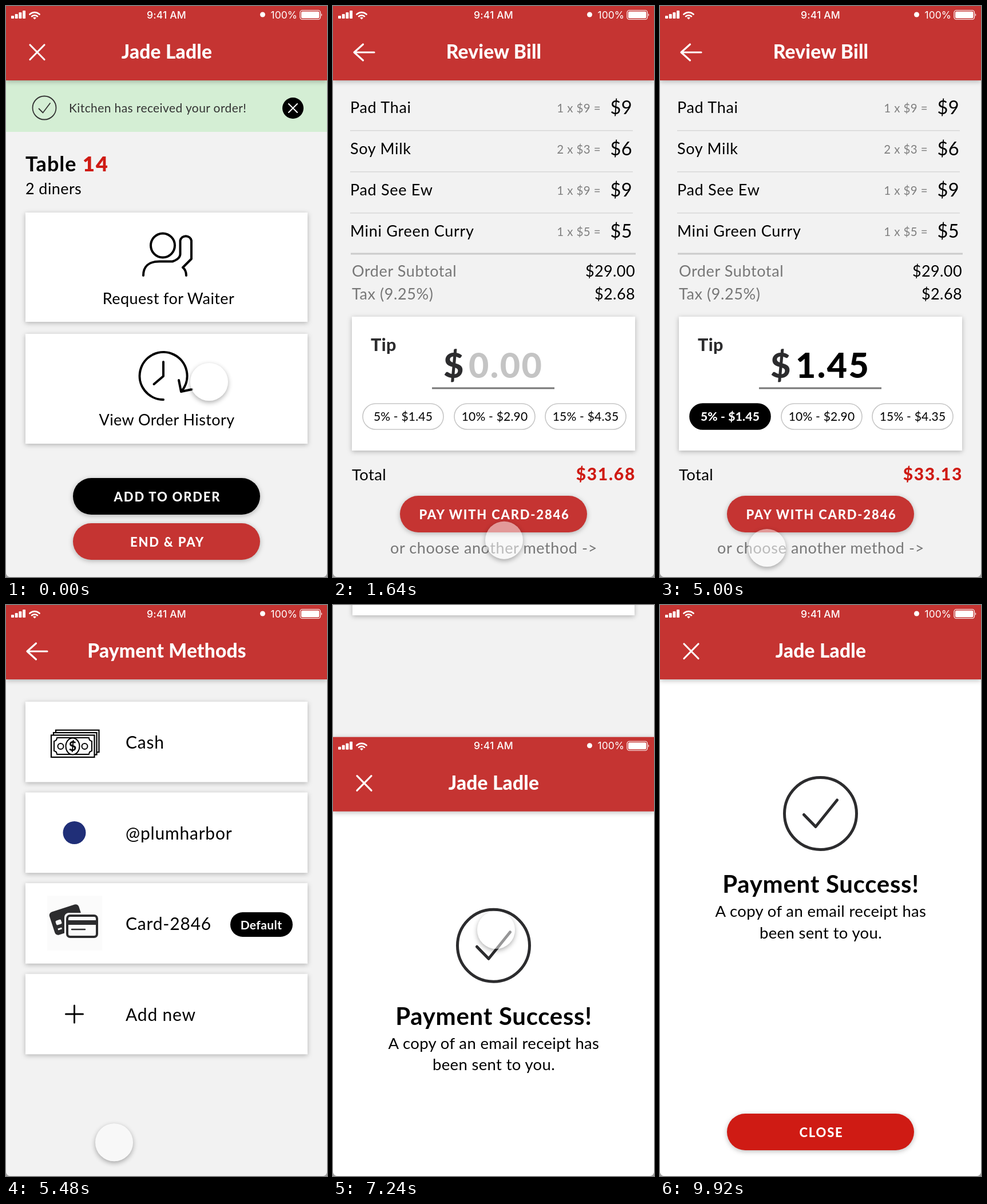
These frames come from a looping animation (561 px wide and 998 px high, 9.96 s). An HTML page:

```html
<!DOCTYPE html>
<html lang="en">
<head>
<meta charset="utf-8">
<title>Restaurant checkout</title>
<style>
  html, body { margin: 0; width: 100%; height: 100%; overflow: hidden; background: #a4a4a4; }
  #stage { position: relative; width: 561px; height: 998px; overflow: hidden; border-radius: 0 0 8px 8px; background: #f2f2f2; }
  svg { display: block; font-family: Lato, "Open Sans", sans-serif; }
  .shade { filter: drop-shadow(0 2px 4px rgba(0, 0, 0, .27)); }
  .line { fill: none; stroke-linecap: round; stroke-linejoin: round; }
  #cursor { position: absolute; left: -33px; top: -33px; width: 66px; height: 66px; border-radius: 50%;
    background: rgba(255, 255, 255, .5); box-shadow: 0 3px 8px rgba(0, 0, 0, .32); }
</style>
</head>
<body>
<div id="stage">
  <svg id="art" width="561" height="998"></svg>
  <div id="cursor"></div>
</div>
<script>
const RED = '#c53432', BRIGHT = '#cf1b14', DARK = '#2c2c2e';
const $ = id => document.getElementById(id);

// Drawing helpers
const text = (x, y, str, { size = 27, weight = 400, fill = '#000', gap = .4, anchor = 'start', font = '' } = {}) =>
  `<text x="${x}" y="${y}" font-size="${size}" font-weight="${weight}" fill="${fill}" letter-spacing="${gap}"
    text-anchor="${anchor}" ${font && `font-family="${font}"`}>${str}</text>`;
const mid = (x, y, str, o) => text(x, y, str, { anchor: 'middle', ...o });
const end = (x, y, str, o) => text(x, y, str, { anchor: 'end', ...o });
const rect = (x, y, w, h, fill, more = '') =>
  `<rect x="${x}" y="${y}" width="${w}" height="${h}" fill="${fill}" ${more}/>`;
const circle = (x, y, r, fill, more = '') => `<circle cx="${x}" cy="${y}" r="${r}" fill="${fill}" ${more}/>`;
const line = (d, width, color = '#000') => `<path class="line" d="${d}" stroke="${color}" stroke-width="${width}"/>`;
const card = (x, y, w, h) => rect(x, y, w, h, '#fff', 'class="shade"');
const button = (y, str, fill) => rect(117, y, 327, 64, fill, 'rx="32" class="shade"') +
  mid(282, y + 40.5, str, { size: 22, weight: 800, fill: '#fff', gap: 1.8 });
const group = (id, body) => `<g id="${id}">${body}</g>`;

const statusBar = () => {
  const bars = [5, 8, 11, 14].map((h, i) => rect(9 + i * 6.7, 22 - h, 5, h, '#fff', 'rx="1"')).join('');
  const wifi = line('M41.5 14.5A12.3 12.3 0 0 1 58.5 14.5', 2.8, '#fff') +
    line('M45 18.2A7.2 7.2 0 0 1 55 18.2', 2.6, '#fff') + '<path d="M47 20.6Q50 18.4 53 20.6L50 23.4Z" fill="#fff"/>';
  const font = 'Inter, Roboto, sans-serif';
  return bars + wifi +
    mid(280.5, 21.5, '9:41 AM', { size: 17.5, weight: 500, fill: '#fff', gap: .2, font }) +
    circle(448.5, 15, 4.5, '#fff') +
    end(509, 21.5, '100%', { size: 17.5, fill: '#fff', gap: 0, font }) +
    rect(514, 7.5, 35.5, 16, 'none', 'rx="4" stroke="#fff" stroke-width="1.2"') +
    rect(516, 9.5, 31.5, 12, '#fff', 'rx="2"') + '<path d="M551 13q2.5 2.5 0 5z" fill="#fff"/>';
};
const header = (title, icon) => rect(0, 0, 561, 130, RED, 'class="shade"') + statusBar() +
  line(icon, 3.2, '#fff') + mid(281, 92, title, { size: 33.5, weight: 800, fill: '#fff', gap: .2 });
const cross = 'M42 68L67 93.500M67 68L42 93.500', back = 'M72 81H37M52.500 67L37 81L52.500 95';

const home = () => rect(0, 0, 561, 998, '#f2f2f2') + rect(0, 130, 561, 90, '#d4eed4') +
  header('Jade Ladle', cross) +
  circle(67, 178, 20.5, 'none', 'stroke="#333" stroke-width="1.8"') + line('M57.500 179.500L64.500 186.500L77 170', 1.8, '#333') +
  text(110, 186, 'Kitchen has received your order!', { size: 21, fill: '#333' }) +
  circle(501.5, 178.5, 18.5, '#000') + line('M494 171L509 186M509 171L494 186', 2, '#fff') +
  text(34, 289, 'Table', { size: 36, weight: 700, gap: 1 }) + text(134, 289, '14', { size: 36, weight: 900, fill: BRIGHT, gap: 2 }) +
  text(34, 329, '2 diners') +
  card(34, 361, 493, 191) + circle(274, 418.5, 21, 'none', 'stroke="#000" stroke-width="4"') +
  line('M240 471C240 455 250 446.500 268 446.500H291Q304 442 304.500 434V410A10 10 0 0 1 324 410V442L309 457Q315 462 315 471', 4) +
  mid(284, 521, 'Request for Waiter') +
  card(34, 573, 493, 192) + line('M275 688A41.500 41.500 0 1 1 307 673', 4) +
  line('M275 622V647L258.500 661M302 654L306 674L325 670', 4) +
  mid(281, 733, 'View Order History') +
  button(825, 'ADD TO ORDER', '#000') + button(904, 'END &amp; PAY', RED);

const pill = (x, str, on) =>
  rect(x + 1, 695, 141, 45, on ? '#000' : '#fff', `rx="22.5" stroke="${on ? '#000' : '#c6c6c6'}" stroke-width="1.6"`) +
  mid(x + 71.5, 724.5, str, { size: 21, gap: .2, fill: on ? '#fff' : '#000', weight: on ? 800 : 400 });
const tipState = (amount, total, on) =>
  text(237, 650, amount, { size: 61, weight: 800, fill: on ? '#000' : '#c4c4c4', gap: 2.4 }) +
  pill(51, '5% - $1.45', on) +
  end(529, 829, total, { size: 30, weight: 800, fill: BRIGHT, gap: 1.7 });
const bill = () => {
  const items = [['Pad Thai', 1, 9], ['Soy Milk', 2, 3], ['Pad See Ew', 1, 9], ['Mini Green Curry', 1, 5]];
  const rows = items.map(([name, count, price], i) => {
    const y = 187 + i * 72;
    return text(30, y, name, { gap: .7 }) + end(468, y - 1, `${count} x $${price} =`, { size: 20.5, fill: '#808080' }) +
      end(523, y + 1.5, '$' + count * price, { size: 32.5 }) + (i < 3 ? rect(30, y + 30, 494, 1.5, '#d8d8d8') : '');
  }).join('');
  const gray = { fill: '#777', gap: .6 };
  return rect(0, 0, 561, 998, '#f2f2f2') + header('Review Bill', back) + rows +
    rect(31, 431.5, 498, 3, '#cbcbcb') +
    text(33, 473, 'Order Subtotal', gray) + end(528, 473, '$29.00') +
    text(33, 513, 'Tax (9.25%)', gray) + end(528, 513, '$2.68') +
    card(33, 543, 495, 234) + text(66, 603, 'Tip', { size: 30.5, weight: 800, fill: DARK }) +
    text(193, 650, '$', { size: 61, weight: 800, fill: DARK }) + rect(173, 666.5, 214, 3, '#777') +
    pill(211, '10% - $2.90') + pill(370, '15% - $4.35') +
    text(33, 829, 'Total', { size: 27.5 }) +
    group('noTip', tipState('0.00', '$31.68', false)) + group('tip', tipState('1.45', '$33.13', true)) +
    button(856, 'PAY WITH CARD-2846', RED) +
    mid(281, 957, 'or choose another method -&gt;', gray);
};

const cashIcon = () => {
  const notes = [8, 4, 0].map(d => rect(79 + d, 227.5 - d * 1.1, 75.5, 38.5, '#fff', 'stroke="#000" stroke-width="2.2"')).join('');
  const ring = 'stroke="#000" stroke-width="2"';
  return notes + line('M89 232H145Q145 237 150 238V255Q145 256 145 261H89Q89 256 84 255V238Q89 237 89 232Z', 2) +
    circle(95.5, 247, 5, 'none', ring) + circle(137.5, 247, 5, 'none', ring) +
    `<ellipse cx="116.500" cy="247" rx="12" ry="14.500" fill="#fff" ${ring}/>` +
    mid(116.5, 255, '$', { size: 23, weight: 800, gap: 0 });
};
const cardsIcon = () => rect(72, 508, 96, 96, '#fbfbfb') +
  `<g transform="rotate(-18 106 549)">${rect(79, 529, 54, 42, DARK, 'rx="6"')}${rect(86, 546, 10, 8, '#fbfbfb', 'rx="2"')}${rect(86, 560, 7, 3, '#fbfbfb')}</g>` +
  rect(102, 538, 62, 47, '#fbfbfb', 'rx="8"') + rect(107, 543, 52, 37, '#fbfbfb', `rx="5" stroke="${DARK}" stroke-width="4"`) +
  rect(107, 551, 52, 8, DARK) + line('M115 567H138', 2.5, DARK);
const methods = () => {
  const names = ['Cash', '@plumharbor', 'Card-2846', 'Add new'];
  return rect(0, 0, 561, 998, '#f2f2f2') + header('Payment Methods', back) +
    names.map((name, i) => card(34, 169 + i * 158.6, 493, 140.5) +
      text(209, 251 + i * 158.6, name, { size: 30, gap: .8 })).join('') +
    cashIcon() + circle(119.5, 398, 20, '#202f78') + cardsIcon() +
    line('M104.500 715H134.500M119.500 700V730', 3) +
    rect(392, 537, 109, 43, '#000', 'rx="21.5"') + mid(446, 567, 'Default', { size: 21, weight: 700, fill: '#fff' });
};

const done = () => rect(0, 0, 561, 998, '#fff') + header('Jade Ladle', cross) +
  circle(280.5, 364.5, 63, 'none', `stroke="${DARK}" stroke-width="5"`) + line('M251.500 366.500L272 387.500L309.500 341', 5, DARK) +
  mid(281, 503, 'Payment Success!', { size: 42, weight: 700, gap: .7 }) +
  mid(281, 545, 'A copy of an email receipt has', { size: 27.5, gap: .35 }) +
  mid(281, 582.5, 'been sent to you.', { size: 27.5, gap: .35 }) +
  button(889, 'CLOSE', BRIGHT);

$('art').innerHTML = Object.entries({ home, bill, methods, done }).map(([id, draw]) => group(id, draw())).join('');

// Motion
const LOOP = 9960, W = 561, H = 998;
const progress = (t, start, duration) => Math.min(1, Math.max(0, (t - start) / duration));
const ease = p => p < .5 ? 2 * p * p : 1 - 2 * (1 - p) ** 2;
const moves = [ // start, duration, x, y
  [0, 900, 300, 935], [1580, 1080, 143, 721], [3700, 1000, 187, 947],
  [5380, 1000, 285, 568], [7355, 1010, 329, 914], [8700, 1000, 960, 914]
];
const place = (id, x, y, shown) => {
  $(id).setAttribute('transform', `translate(${x} ${y})`);
  $(id).style.display = shown ? '' : 'none';
};

function frame() {
  const t = performance.now() % LOOP;
  const toBill = ease(progress(t, 1040, 400));
  const toMethods = ease(progress(t, 5030, 400));
  const toDone = ease(progress(t, 6977, 400));
  place('home', -W * toBill, 0, toBill < 1);
  place('bill', W * (1 - toBill - toMethods), 0, toBill > 0 && toMethods < 1);
  place('methods', W * (1 - toMethods), -H * toDone, toMethods > 0 && toDone < 1);
  place('done', 0, H * (1 - toDone), toDone > 0);

  const tipped = progress(t, 3000, 300);
  $('noTip').style.opacity = 1 - tipped;
  $('tip').style.opacity = tipped;

  let x = 355, y = 657;
  for (const [start, duration, toX, toY] of moves) {
    const p = ease(progress(t, start, duration));
    x += (toX - x) * p;
    y += (toY - y) * p;
  }
  $('cursor').style.transform = `translate(${x}px, ${y}px)`;
  requestAnimationFrame(frame);
}
frame();
</script>
</body>
</html>
```
